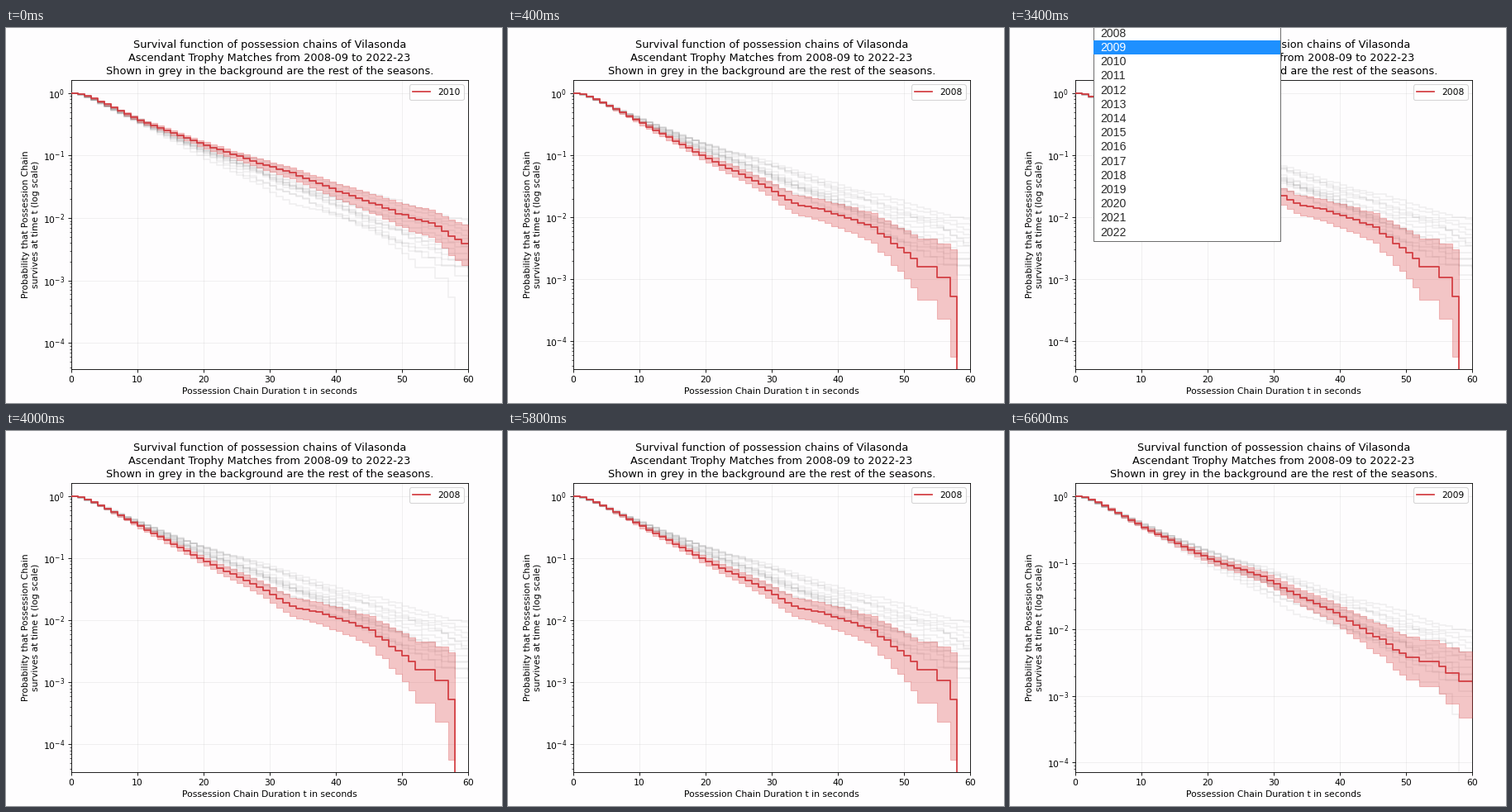
Animation, 600 px wide and 454 px high, one loop 8 s. Source, as a matplotlib script:

```python
import numpy as np
import matplotlib.pyplot as plt
from matplotlib.animation import FuncAnimation
from matplotlib.patches import Rectangle

W, H, DPI = 600, 454, 64
PX = 72 / DPI          # points per pixel
S = 1.075 * PX         # chart scale relative to default point sizes
RED, PAPER = "#d62728", "#fefdfe"

plt.rcParams.update({
    "font.family": "DejaVu Sans", "font.size": 10 * S,
    "lines.linewidth": 1.6 * S, "patch.linewidth": S,
    "axes.linewidth": 0.8 * S, "axes.titlepad": 6.5 * S,
    "axes.labelpad": 4 * S, "grid.linewidth": 0.8 * S,
})
for axis in ("xtick", "ytick"):
    for kind, size, width, pad in (("major", 3.5, 0.8, 3.5), ("minor", 2, 0.6, 3.4)):
        plt.rcParams[f"{axis}.{kind}.size"] = size * S
        plt.rcParams[f"{axis}.{kind}.width"] = width * S
        plt.rcParams[f"{axis}.{kind}.pad"] = pad * S

T = np.arange(61)
KEYS = [0, 10, 20, 28, 33, 38, 45, 50, 54, 57, 59]

# Per season: number of chains, decades lost at KEYS, decades in view
SEASONS = {
    2008: (1858, [0, .485, 1.056, 1.46, 1.78, 1.9, 2.16, 2.6, 2.86, 3.2, 4.2], 4.235),
    2009: (1820, [0, .471, .948, 1.208, 1.48, 1.7, 2.1, 2.415, 2.48, 2.68, 2.78], 3.946),
    2010: (1780, [0, .432, .835, 1.12, 1.277, 1.49, 1.753, 1.96, 2.083, 2.29, 2.405], 4.21),
}


def warm(t):
    """Time with a slow start: hardly any chain ends in its first seconds."""
    t = np.asarray(t)
    return t - 1.6 * (1 - np.exp(-t / 1.6))


def survival(total, drop):
    """Whole chains left out of total after a loss of drop decades."""
    return np.minimum.accumulate(np.round(total * 10.0 ** -np.maximum(drop, 0))) / total


def confidence(s, total):
    """Log-log Greenwood interval, 95 %."""
    logs = np.log(np.clip(s, 1e-9, 1 - 1e-9))
    err = 1.96 * np.sqrt((1 - s) / (np.maximum(s, 1e-9) * total)) / -logs
    return np.exp(logs * np.exp(err)), np.exp(logs * np.exp(-err))


def background_curves(n=12):
    rng = np.random.default_rng(11)
    base = .0685 * warm(T) ** .879
    for end in np.linspace(2.06, 2.95, n):
        spread = 1 + (end / base[-1] - 1) * (.35 + .65 * T / 60)
        walk = np.cumsum(rng.normal(0, .011, T.size))
        walk = (walk - walk[-1] * T / 60) * np.minimum(T / 25, 1)
        yield survival(rng.integers(1700, 1950), base * spread + walk)


fig = plt.figure(figsize=(W / DPI, H / DPI), dpi=DPI, facecolor=PAPER)
ax = fig.add_axes([79 / W, 1 - 413 / H, 480 / W, 350 / H], facecolor=PAPER)
ax.set_yscale("log", nonpositive="clip")
ax.set_xlim(0, 60)
ax.grid(alpha=.2)
ax.set_title("Survival function of possession chains of Vilasonda\n"
             "Ascendant Trophy Matches from 2008-09 to 2022-23\n"
             "Shown in grey in the background are the rest of the seasons.",
             linespacing=1.29)
ax.set_xlabel("Possession Chain Duration t in seconds")
ax.set_ylabel("Probability that Possession Chain\nsurvives at time t (log scale)",
              linespacing=1.29)


def step(s, **style):
    return ax.step(T, np.maximum(s, 1e-8), where="post", **style)[0]


GREY = dict(color="grey", alpha=.11)
for curve in background_curves():
    step(curve, **GREY)

greys, reds, bands = {}, {}, {}
for year, (total, drops, _) in SEASONS.items():
    s = survival(total, np.interp(warm(T), warm(KEYS), drops))
    low, high = confidence(s, total)
    stop = min(np.count_nonzero(s), 60)
    low[stop], high[stop] = low[stop - 1], high[stop - 1]
    cut = slice(0, stop + 1)
    greys[year] = step(s, **GREY)
    bands[year] = ax.fill_between(T[cut], low[cut], high[cut], step="post",
                                  color=RED, alpha=.26, zorder=3)
    reds[year] = step(s, color="#d23a3f", zorder=4)

legend = ax.legend([reds[2008]], ["2008"], loc="upper right")
legend.set_zorder(6)

# Season drop-down, laid out in pixels
top = fig.add_axes([0, 0, 1, 1], zorder=5)
top.set(xlim=(0, W), ylim=(H, 0))
top.axis("off")
ROW, FIRST = 17.2, -2.3
bar = Rectangle((101, FIRST), 225.5, ROW, fc="#1e90ff", lw=0)
menu = [top.add_patch(Rectangle((100.5, -10), 226.5, 267.5, fc="white",
                                ec="#6e6e6e", lw=PX)),
        top.add_patch(bar)]
items = {year: top.text(109.5, FIRST + k * ROW + 13.1, str(year),
                        family="Liberation Sans", size=14.1 * PX)
         for k, year in enumerate(range(2008, 2023))}
menu += items.values()


def show_season(current):
    for year in SEASONS:
        active = year == current
        greys[year].set_visible(not active)
        reds[year].set_visible(active)
        bands[year].set_visible(active)
    depth = SEASONS[current][2]
    ax.set_ylim(10 ** (-1.05 * depth), 10 ** (.05 * depth))
    legend.get_texts()[0].set_text(str(current))


def show_menu(hover):
    for part in menu:
        part.set_visible(hover is not None)
    if hover is not None:
        bar.set_y(FIRST + (hover - 2008) * ROW)
        for year, item in items.items():
            item.set_color("white" if year == hover else "#2a2a2a")


def update(i):
    ms = i * 200
    show_season(2010 if ms < 200 else 2008 if ms < 6200 else 2009)
    is_open = 2800 <= ms < 4000
    show_menu((2008 if ms < 3400 else 2009) if is_open else None)
    return []


anim = FuncAnimation(fig, update, frames=40, interval=200,
                     repeat=True, repeat_delay=0, blit=False)
plt.show()
```
